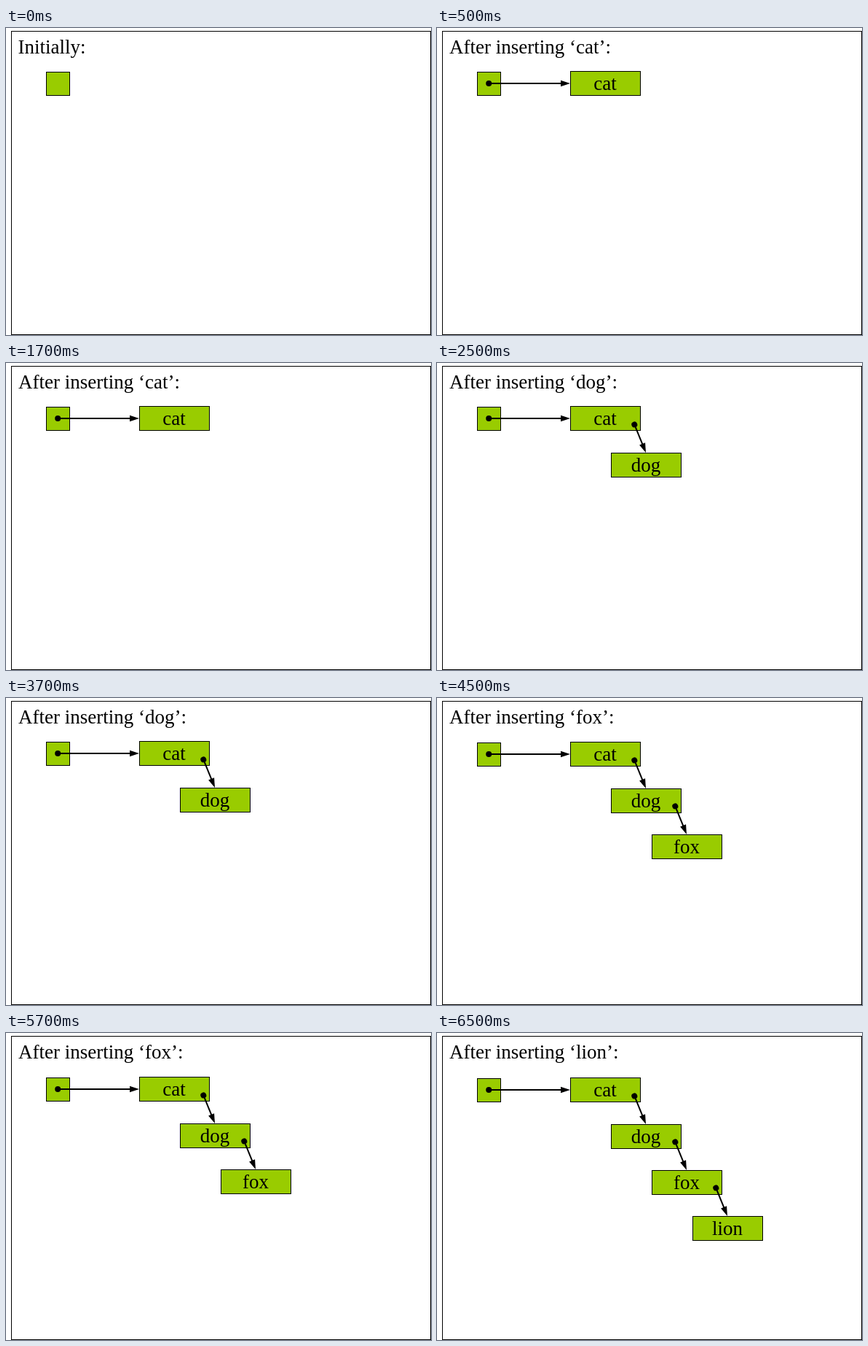
These frames come from a looping animation (584x421 px, 8 s). An HTML page:

```html
<!DOCTYPE html>
<html lang="en">
<head>
<meta charset="utf-8">
<title>Inserting into a linked list</title>
<style>
  html, body { margin: 0; width: 100%; height: 100%; overflow: hidden; background: #fff; }
  svg { display: block; }
  text { font: 27px "Liberation Serif", "Times New Roman", serif; }
  rect { stroke: #000; fill: #9c0; }
  .border { fill: none; }
  .link { stroke: #000; stroke-width: 2; }
  .node { text-anchor: middle; }
</style>
</head>
<body>
<svg id="stage" width="584" height="421" viewBox="0 0 584 421"></svg>
<script>
const stage = document.getElementById('stage');
const words = ['cat', 'dog', 'fox', 'lion'];
const nodeTops = [59, 123, 186, 249];

const box = (x, y, w, h, cls = '') =>
  `<rect class="${cls}" x="${x + 0.5}" y="${y + 0.5}" width="${w}" height="${h}"/>`;

const label = (x, y, text, cls = '') =>
  `<text class="${cls}" x="${x}" y="${y}">${text}</text>`;

// A dot at the tail, a line, and a slim arrowhead at the tip.
function link(x1, y1, x2, y2) {
  const angle = Math.atan2(y2 - y1, x2 - x1) * 180 / Math.PI;
  const length = Math.hypot(x2 - x1, y2 - y1);
  return `<g transform="translate(${x1} ${y1}) rotate(${angle})">
    <circle r="4"/>
    <path class="link" d="M0 0H${length - 10}"/>
    <path d="M${length} 0l-13 -4.3v8.6z"/>
  </g>`;
}

function draw(count) {
  const shift = Math.max(0, count - 2); // the list sinks a pixel per later insertion
  const title = count ? `After inserting ‘${words[count - 1]}’:` : 'Initially:';
  let svg = box(7, 4, 576, 416, 'border') +
    label(count ? 17 : 16.5, 35, title) +
    box(55, 60 + shift, 32, 32);

  for (let i = 0; i < count; i++) {
    const x = 183 + 56 * i, y = nodeTops[i] + shift;
    svg += box(x, y, 96, 33) + label(x + 48, y + 26, words[i], 'node');
  }
  for (let i = 0; i < count; i++) {
    const x = 183 + 56 * i, y = nodeTops[i] + shift;
    svg += i ? link(x + 32.3, y - 38.6, x + 48, y) : link(71.2, y + 17, x, y + 17);
  }
  stage.innerHTML = svg;
}

let shown = -1;
function tick(now) {
  const t = now % 8000;
  const count = t < 500 ? 0 : 1 + Math.floor((t - 500) / 2000);
  if (count !== shown) draw(shown = count);
  requestAnimationFrame(tick);
}
tick(performance.now());
</script>
</body>
</html>
```
